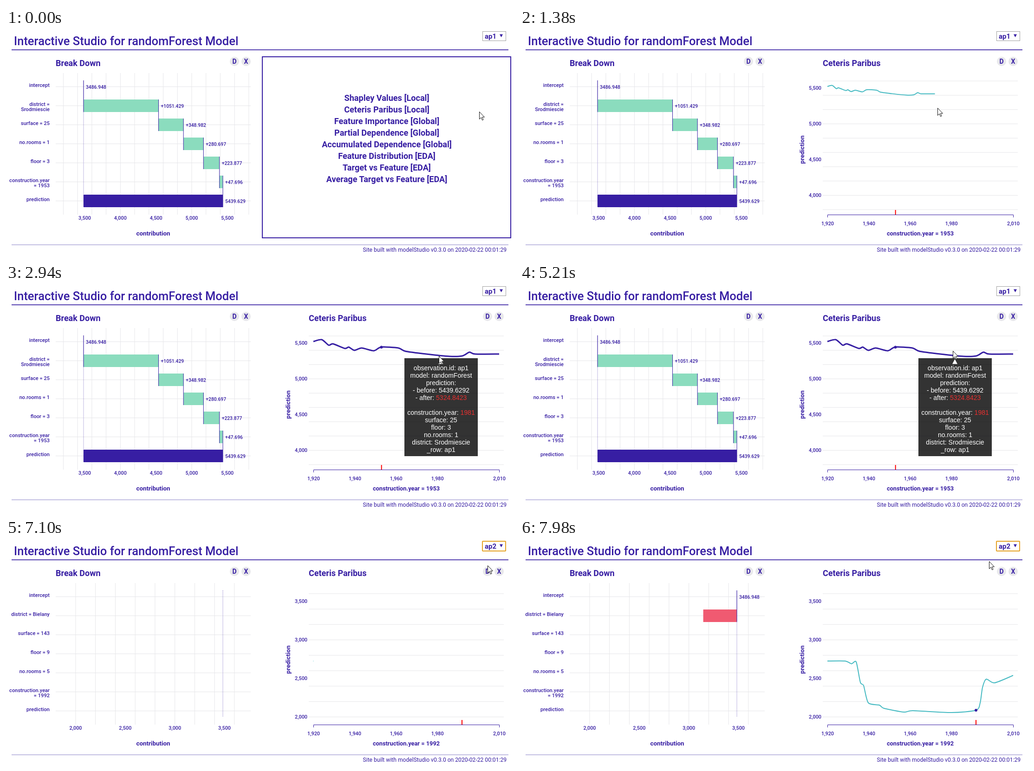
These frames come from a looping animation (1094x489 px, 8 s). An HTML page:

```html
<!DOCTYPE html>
<html lang="en">
<head>
<meta charset="utf-8">
<title>Interactive Studio</title>
<style>
html, body { margin: 0; width: 100%; height: 100%; overflow: hidden; background: #fff; }
svg { display: block; font-family: Roboto, "Open Sans", sans-serif; fill: #371ea3; }
.title { font-size: 25.5px; font-weight: 500; }
.head { font-size: 18px; font-weight: 700; }
.item { font-size: 18.1px; font-weight: 700; }
.axis { font-size: 13.4px; font-weight: 700; }
.year { font-size: 12.8px; font-weight: 700; }
.name { font-size: 11.1px; font-weight: 500; }
.tick { font-size: 10.8px; font-weight: 500; }
.num { font-size: 10.3px; font-weight: 500; }
.foot { font-size: 12.1px; }
.btn { font-size: 14px; font-weight: 700; }
.opt { font-size: 15px; font-weight: 700; }
.tip { font: 14px "Liberation Sans", Arial, sans-serif; fill: #fff; }
.end { text-anchor: end; }
.mid { text-anchor: middle; }
.grid { stroke: #e6e6e9; fill: none; }
.edge { stroke: #371ea3; fill: none; }
.line { fill: none; stroke: #46bac2; stroke-width: 2; stroke-linejoin: round; }
.line.thick { stroke: #371ea3; stroke-width: 3; }

/* percent = ms / 80 */
#cursor { animation: move 8s ease-in-out infinite; }
@keyframes move {
  0%, 3.25% { transform: translate(1019px, 180px) }
  12%, 21.87% { transform: translate(899px, 172px) }
  31.62% { transform: translate(928px, 160px) }
  32.37% { transform: translate(930px, 158px); animation-timing-function: step-end }
  35.49% { transform: translate(932px, 157px); animation-timing-function: step-end }
  65.12% { transform: translate(932px, 146px) }
  75.12%, 79.25% { transform: translate(1042px, 15px) }
  84%, 96.1% { transform: translate(1037px, 59px) }
  99.7%, 100% { transform: translate(1010px, 50px) }
}
</style>
</head>
<body>
<svg id="stage" width="1094" height="489" viewBox="0 0 1094 489"></svg>
<script>
const LOOP = 8000, TIME = 500;

const text = (x, y, cls, s) => `<text x="${x}" y="${y}" class="${cls}">${s}</text>`;
const rect = (x, y, w, h, rest = '') => `<rect x="${x}" y="${y}" width="${w}" height="${h}" ${rest}/>`;
const path = (d, rest = '') => `<path d="${d}" ${rest}/>`;
const range = (from, to, by) => Array.from({ length: Math.floor((to - from) / by) + 1 }, (_, i) => from + i * by);
const comma = n => n.toLocaleString('en-US');

// Timing helpers: each adds its own keyframes
const rules = [];
const percent = ms => (ms / LOOP * 100).toFixed(3) + '%';
function animate(frames, easing) {
  rules.push(`@keyframes k${rules.length} { ${frames} }`);
  return `style="animation: k${rules.length - 1} ${LOOP}ms ${easing} infinite"`;
}
function shown(from, to, ...parts) {
  const frames = `0% { opacity: 0 } ${percent(from)} { opacity: 1 } ${percent(to)}, 100% { opacity: 0 }`;
  return `<g ${animate(frames, 'step-end')}>${parts.join('')}</g>`;
}
function tween(start, before, after) {
  const end = Math.min(start + TIME, LOOP);
  return animate(`0%, ${percent(start)} { ${before} } ${percent(end)}, 100% { ${after} }`,
    'cubic-bezier(.65, 0, .35, 1)');
}

const buttons = x => ['D', 'X'].map((s, i) =>
  `<circle cx="${x + 25 * i}" cy="72" r="10" fill="#e8e8eb"/>` + text(x + 25 * i, 77, 'btn mid', s)).join('');

// Break Down: axes, grid and row names
function breakdown(x, grid, ticks, rows, zero) {
  const cols = grid.map(v => `M${x(v) + .5} 97V402`).join('');
  const lines = range(126.5, 373, 41).map(y => `M107 ${y}H527`).join('');
  const names = rows.map((row, i) => row.split('|').map((s, j) =>
    text(94, 127 + 41 * i + 11 * j, 'name end', s)).join('')).join('');
  return path(cols + lines, 'class="grid"') + names +
    ticks.map(v => text(x(v) + .5, 413, 'tick mid', comma(v))).join('') +
    path(`M${zero} 113V386`, 'class="edge" stroke-dasharray="1 2"');
}

const price1 = v => 167 + (v - 3486.948) * .15364;
const price2 = v => 149.5 + (v - 2000) * .21367;

function waterfall() {
  const steps = [0, 1051.429, 348.982, 280.697, 223.877, 47.696];
  let sum = 3486.948, bars = '', marks = '';
  steps.forEach((d, i) => {
    const x0 = price1(sum), x1 = price1(sum += d), y = 113 + 41 * i;
    bars += rect(x0, y, x1 - x0, 27, 'fill="#8bdcbe"');
    marks += path(`M${x1} ${y}v68`, 'class="edge"') + text(x1 + 5, y + 18, 'num', i ? '+' + d : sum);
  });
  return bars + rect(167, 359, 300, 27) + marks + text(472, 377, 'num', '5439.629');
}

// Ceteris Paribus: heading, axes and grid
const yearX = v => 662 + (v - 1920) * 400 / 90;

function ceteris(y, grid, ticks, year) {
  return text(652, 82, 'head', 'Ceteris Paribus') + buttons(1037) +
    '<text transform="translate(612 262) rotate(-90)" class="axis mid">prediction</text>' +
    path(grid.map(v => `M652 ${y(v) + .5}H1072`).join(''), 'class="grid"') +
    ticks.map(v => text(649, y(v) + 4, 'tick end', comma(v))).join('') +
    path('M662.5 408V402.5H1062.5V408', 'class="edge"') +
    [1920, 1940, 1960, 1980, 2010].map(v => text(yearX(v) + .5, 425, 'tick mid', comma(v))).join('') +
    rect(yearX(year) - 1, 392, 2, 10, 'fill="#f00"') +
    text(862, 447, 'year mid', 'construction.year = ' + year);
}

// Turning points of the two profiles
const profile1 = [[662, 126], [680, 122], [695, 134], [704, 131], [730, 141], [738, 138], [750, 145], [766, 140],
  [792, 146], [808, 138], [845, 140], [860, 147], [905, 153], [955, 158], [983, 157], [998, 149], [1010, 153], [1062, 153]];
const profile2 = [[662, 265], [700, 265], [714, 271], [724, 267], [733, 311], [740, 318], [750, 355], [774, 360],
  [784, 367], [827, 375], [846, 372], [929, 376], [982, 371], [991, 355], [996, 322], [1004, 304], [1022, 312], [1062, 296]];

// Smooth path through the points, scaled by k about the first one
function smooth(points, k = 1) {
  const pts = points.map(p => p.map((v, c) => points[0][c] + (v - points[0][c]) * k));
  const at = i => pts[Math.max(0, Math.min(pts.length - 1, i))];
  const ctrl = (i, s) => at(i).map((v, c) => (v + s * (at(i + 1)[c] - at(i - 1)[c]) / 8).toFixed(2));
  return 'M' + pts[0] + pts.slice(1).map((p, i) => `C${ctrl(i, 1)} ${ctrl(i + 1, -1)} ${p}`).join('');
}

// The line unfolds, then its point swells
const curve = (points, start, x, y) =>
  path(smooth(points), 'class="line" ' +
    tween(start, `d: path("${smooth(points, 0)}")`, `d: path("${smooth(points)}")`)) +
  `<circle cx="${x}" cy="${y}" r="3" ${tween(start + TIME, 'r: 0', 'r: 3px')}/>`;

const red = s => `<tspan fill="#e8302f">${s}</tspan>`;
const tipLines = ['observation.id: ap1', 'model: randomForest', 'prediction:', '- before: 5439.6292',
  '- after: ' + red('5324.8423'), '', 'construction.year: ' + red('1981'), 'surface: 25', 'floor: 3',
  'no.rooms: 1', 'district: Srodmiescie', '_row: ap1'];
const menuItems = ['Shapley Values [Local]', 'Ceteris Paribus [Local]', 'Feature Importance [Global]',
  'Partial Dependence [Global]', 'Accumulated Dependence [Global]', 'Feature Distribution [EDA]',
  'Target vs Feature [EDA]', 'Average Target vs Feature [EDA]'];

// Key moments in ms
const OPEN = 1100, DRAW = 1117, HOVER = 2835, LEAVE = 5240, FOCUS = 6010,
  POPUP = 6070, LIST = 6112, NEXT = 6560, PICKED = 6960, SWAP = 7078, REDRAW = 7097;

const frame = text(17, 37, 'title', 'Interactive Studio for randomForest Model') +
  rect(12, 46, 1070, 2, 'fill="#5742b2"') + rect(12, 466, 1070, 2, 'fill="#c3bfe3"') +
  text(1078, 482, 'foot end', 'Site built with modelStudio v0.3.0 on 2020-02-22 00:01:29') +
  text(107, 82, 'head', 'Break Down') + buttons(492) + text(317, 447, 'axis mid', 'contribution');

const left1 = shown(0, SWAP,
  breakdown(price1, range(3200, 5800, 200), range(3500, 5500, 500), ['intercept', 'district =|Srodmiescie',
    'surface = 25', 'no.rooms = 1', 'floor = 3', 'construction.year|= 1953', 'prediction'], 167),
  waterfall());

const left2 = shown(SWAP, LOOP,
  breakdown(price2, range(2000, 3600, 200), range(2000, 3500, 500), ['intercept', 'district = Bielany',
    'surface = 143', 'floor = 9', 'no.rooms = 5', 'construction.year|= 1992', 'prediction'], 467),
  rect(467, 154, 0, 27, 'fill="#f05a71" ' +
    tween(REDRAW + TIME, 'x: 467px; width: 0', 'x: 394.5px; width: 72.5px')),
  rect(466.5, 113, 1, 0, tween(REDRAW + TIME, 'height: 0', 'height: 68px')),
  shown(REDRAW + TIME, LOOP, text(472, 131, 'num', '3486.948')));

const menu = shown(0, OPEN,
  rect(552, 62, 535, 390, 'fill="#fff" stroke="#371ea3" stroke-width="2"'),
  menuItems.map((s, i) => text(820, 156.5 + 25 * i, 'item mid', s)).join(''));

const right1 = shown(OPEN, SWAP,
  ceteris(v => 129 + (5500 - v) * .154, range(3800, 5600, 200), range(4000, 5500, 500), 1953),
  curve(profile1, DRAW, 808.5, 138.3),
  shown(HOVER, LEAVE, path(smooth(profile1), 'class="line thick"'),
    rect(858, 162, 158, 211, 'fill="#000" fill-opacity=".8"'),
    path('M936.5 164l5.5 10.5h-11z', 'fill="#fff"'),
    tipLines.map((s, i) => text(937, 188 + 16 * i, 'tip mid', s)).join('')));

const right2 = shown(SWAP, LOOP,
  ceteris(v => 136 + (3500 - v) * .166, range(2000, 3600, 200), range(2000, 3500, 500), 1992),
  curve(profile2, REDRAW, 982, 371));

const options = active => ['ap1', 'ap2'].map((s, i) =>
  rect(1027, 29 + 19 * i, 48, 19, `fill="${i === active ? '#1e90ff' : '#fff'}"`) +
  `<g fill="${i === active ? '#fff' : '#371ea3'}">${text(1031, 44 + 19 * i, 'opt', s)}</g>`).join('');

const select = rect(1026.5, 7.5, 50, 20, 'fill="#fff" stroke="#a0a0a0"') +
  shown(FOCUS, LOOP, rect(1026, 7, 50, 21, 'rx="1" fill="#fff" stroke="#e5a327" stroke-width="2"')) +
  shown(0, PICKED, text(1031, 23, 'opt', 'ap1')) + shown(PICKED, LOOP, text(1031, 23, 'opt', 'ap2')) +
  path('M1063 13.5h7l-3.5 6.5z') +
  shown(POPUP, PICKED,
    rect(1029, 32, 50, 39, 'fill="#000" fill-opacity=".14"'),
    rect(1028, 31, 50, 38, 'fill="#000" fill-opacity=".3"'),
    rect(1026, 28, 50, 40, 'fill="#fff"'),
    shown(LIST, NEXT, options(0)), shown(NEXT, PICKED, options(1)));

const clicks = [[980, OPEN], [6040, 6140], [6870, PICKED]];
const cursor = '<g id="cursor">' +
  clicks.map(([from, to]) => shown(from, to, '<circle r="12" fill="#ffe800" fill-opacity=".72"/>')).join('') +
  path('M.5 .5V16.3L4.2 12.9L6.6 18.6L9 17.6L6.6 12H11.4Z', 'fill="#fff" stroke="#111"') + '</g>';

const sheet = document.createElement('style');
sheet.textContent = rules.join('\n');
document.head.append(sheet);
document.getElementById('stage').innerHTML =
  frame + left1 + left2 + menu + right1 + right2 + select + cursor;
</script>
</body>
</html>
```
